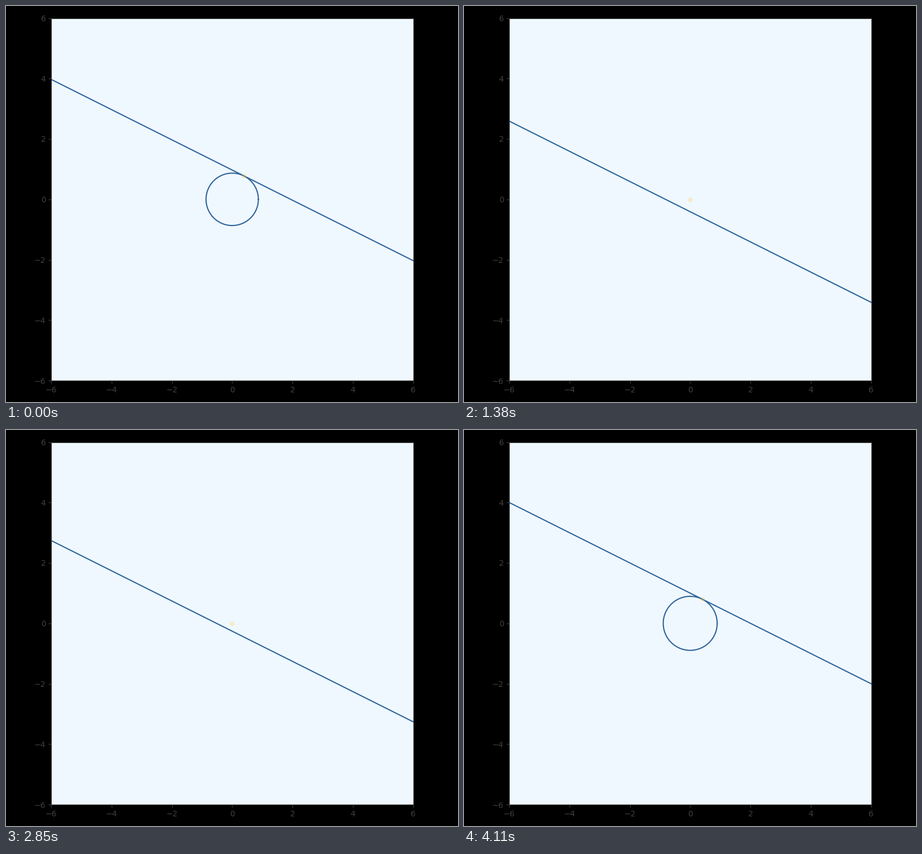
Animation, 800 px wide and 700 px high, one loop 4.14 s. Source, as a matplotlib script:

```python
import numpy as np
import matplotlib.pyplot as plt
from matplotlib.animation import FuncAnimation

W, H, DPI = 800, 700, 100
FRAMES, INTERVAL = 138, 30
STEP = 0.03
BLUE, GREY = "#2d649c", "0.25"

plt.rcParams["font.family"] = "DejaVu Sans"
fig = plt.figure(figsize=(W / DPI, H / DPI), dpi=DPI, facecolor="black")
side = 640.5
ax = fig.add_axes([80.1 / W, 38.0 / H, side / W, side / H], facecolor="aliceblue")
ax.set(xlim=(-6, 6), ylim=(-6, 6))
ticks = np.arange(-6, 7, 2)
ax.set_xticks(ticks)
ax.set_yticks(ticks)
ax.tick_params(colors=GREY, labelsize=10)
for spine in ax.spines.values():
    spine.set_color(GREY)

xs = np.array([-6.0, 6.0])
theta = np.linspace(0, 2 * np.pi, 100)
line, = ax.plot([], [], color=BLUE, lw=1.5)
circle, = ax.plot([], [], color=BLUE, lw=1.5)
dot, = ax.plot([], [], "o", color="#ffd24d", ms=6, mew=0, alpha=0.3, zorder=3)


def offset(i):
    """Intercept of the line: steady fall, then steady rise."""
    half = FRAMES // 2
    return 1 - STEP * (half - abs(i + 1 - half))


def update(i):
    b = offset(i)
    line.set_data(xs, b - xs / 2)
    # Closest point to the origin in the half-plane x + 2y >= 2b
    px, py = 0.4 * max(b, 0), 0.8 * max(b, 0)
    r = np.hypot(px, py)
    circle.set_data(r * np.cos(theta), r * np.sin(theta))
    circle.set_visible(b > 1e-9)
    dot.set_data([px], [py])
    return line, circle, dot


anim = FuncAnimation(fig, update, frames=FRAMES, init_func=lambda: update(0),
                     interval=INTERVAL, repeat=True, repeat_delay=0)
plt.show()
```
